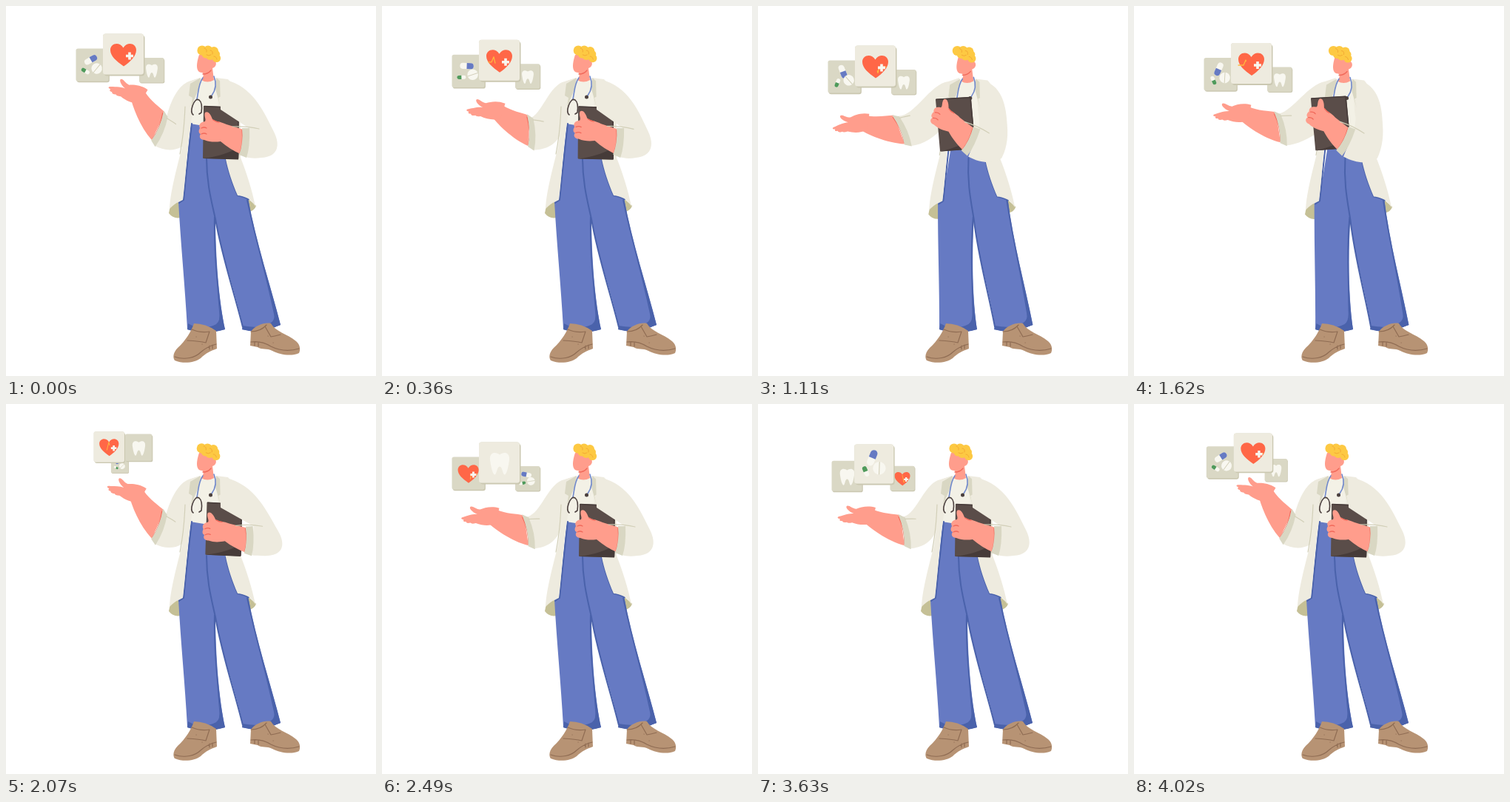
An HTML page that plays this animation: 500x500 px, repeating every 4050 ms.

```html
<!DOCTYPE html>
<html lang="en">
<head>
<meta charset="utf-8">
<title>Doctor with floating cards</title>
<style>
  html, body { margin: 0; width: 100%; height: 100%; overflow: hidden; background: #fff; }
  svg { display: block; width: 100vw; height: 100vh; }
  .line { fill: none; stroke-linecap: round; stroke-linejoin: round; }
  .coat { fill: #eeebdf; }
  .olive { fill: #d9d7c3; }
  .lining { fill: #c5c096; }
  .skin { fill: #ff9d8c; }
  .blush { stroke: #f1695a; stroke-width: 1.3; }
  .blue { fill: #667ac3; }
  .navy { fill: #4a62ab; }
  .seam { stroke: #4a62ab; stroke-width: 2; }
  .fold { stroke: #d2cfb8; stroke-width: 1.2; }
  .shoe { fill: #b79374; }
  .lace { stroke: #8f6c53; stroke-width: 1.2; }
  .white { fill: #f8f7f0; }
</style>
</head>
<body>
<svg viewBox="0 0 500 500">
  <g id="cards">
    <g class="card">
      <path fill="#ff6747" d="M0,16C-10,9 -18,2 -18,-6C-18,-15 -6,-18 -.5,-9C5,-18 17,-15 17,-6C17,2 9,10 0,16Z"/>
      <path id="pulse" class="line" stroke="#ffb83f" stroke-width="1.3" pathLength="100" stroke-dasharray="25 300"
        d="M-18,2H-11L-8,-5L-5,8L-1,-9L3,9L5,1H14"/>
      <path class="white" d="M6.2,-3h3.6v3.2h3.2v3.6h-3.2v3.2h-3.6v-3.2h-3.2v-3.6h3.2z"/>
    </g>
    <g class="card">
      <path class="white" d="M0,-11C-5,-15 -14,-15 -13,-4C-12,4 -10,14 -7,16C-4,17 -4,5 0,5C4,5 4,17 7,16C10,14 12,4 13,-4C14,-15 5,-15 0,-11Z"/>
    </g>
    <g class="card">
      <g id="capsule">
        <rect class="white" x="-11.5" y="-5" width="23" height="10" rx="5"/>
        <path class="blue" d="M0,-5H6.5a5,5 0 0 1 0,10H0Z"/>
      </g>
      <g id="smallPill">
        <rect class="white" x="-7.5" y="-3.2" width="15" height="6.4" rx="3.2"/>
        <path fill="#4f9a5b" d="M0,-3.2H4.3a3.2,3.2 0 0 1 0,6.4H0Z"/>
      </g>
      <g id="tablet">
        <circle class="white" r="9"/>
        <path class="line fold" d="M-8,3L8,-3"/>
      </g>
    </g>
  </g>

  <g class="skin">
    <path d="M266,426h14v14h-14zM336,428h14v14h-14z"/>
  </g>
  <g id="lining" class="lining">
    <path d="M220,280L222,270L240,260L236,286Q226,288 220,280Z"/>
    <path d="M322,256L338,270Q336,276 329,278Z"/>
  </g>

  <g id="legs">
    <path class="navy" d="M245,434Q270,424 296,436Q270,446 245,437ZM319,436Q345,424 371,430Q346,445 319,437Z"/>
    <path class="blue" d="M262,158L300,200L312,255L327,260C338,320 358,380 371,431Q346,441 321,437C310,385 292,340 282,285L270,205Z"/>
    <path class="navy" d="M327,260C338,320 358,380 371,431Q346,442 319,437L320,432Q345,437 358,428Q364,424 362,416C350,360 335,310 325,262Z"/>
    <path class="blue" d="M250,158L272,160L271,205L283,285C283,340 288,400 296,437Q270,444 245,436C242,380 236,320 233,264L239,261C243,230 246,190 250,158Z"/>
    <path class="navy" d="M283,285C282,340 288,400 296,437Q270,445 245,437L246,429Q265,440 284,430Q290,426 288,412C284,360 280,330 281,285Z"/>
    <path class="line seam" d="M271,205C271,240 278,265 283,288C292,340 308,385 320,434"/>
  </g>

  <g class="shoe">
    <path d="M254,429C250,440 243,452 232,462C226,468 225,475 228,479C240,484 255,482 263,476C270,469 277,466 285,463L284,439Q270,429 254,429Z"/>
    <path d="M331,440C336,432 350,427 358,429C364,440 380,443 392,453C398,458 398,465 396,469C385,474 370,471 360,466C352,462 346,465 340,461L330,459Z"/>
    <g class="line lace">
      <path d="M228,474C242,479 256,475 263,468Q272,460 284,457M251,437Q262,442 275,440L270,455Q262,453 245,452M257,447h.2M265,457h.2M275,459v5M279,458v5"/>
      <path d="M331,454Q345,452 358,460Q376,469 396,463M352,431Q344,440 331,440M350,433L358,447Q364,446 371,444M354,446h.2M361,455h.2M336,454v5M341,455v5"/>
    </g>
  </g>

  <path id="leftSleeve" class="coat"/>
  <g id="leftArm">
    <path class="skin" d="M-10,-18C-20,-16 -32,-10 -48,-10L-56,9C-40,15 -12,21 12,17Z"/>
    <path id="leftHand" class="skin" d="M12,-9C2,-13 -8,-11 -14,-9C-20,-10 -22,-14 -26,-14C-30,-13 -25,-6 -18,-3C-25,-4 -34,-1 -39,0q-3,2 2,3q-2,3 3,3q0,3 6,2q1,2 7,1C-12,13 -4,14 6,12Z"/>
    <path class="line blush" stroke-width="2" d="M-11,-15Q4,-2 11,15"/>
    <path class="olive" d="M-13,-18L-3,-18Q14,-2 22,18L12,18Q4,-2 -13,-18Z"/>
    <path class="line fold" d="M-2,-16Q6,-20 11,-22"/>
  </g>

  <g id="upper">
    <path fill="#f3f1e6" d="M260,98L287,98L292,166L249,159Z"/>
    <path class="line seam" stroke-width="3" d="M251,159C247,195 243,230 240,262L234,266M297,207C300,222 306,240 313,256Q320,257 328,261"/>
    <path class="coat" d="M263,97L247,102C243,140 242,165 238,190C232,215 222,250 221,274Q228,267 233,265L239,262C243,230 245,190 250,158L254,128Z"/>
    <path class="coat" d="M284,97L300,99C312,110 320,150 317,205C325,225 333,250 337,271Q333,264 327,260Q318,256 313,256C306,240 300,222 297,207L287,140Z"/>
    <path class="olive" d="M263,97L249,105L247,121L252,124L250,137L261,110ZM284,97L296,107L293,121L287,124L290,137L283,112Z"/>
    <path class="line fold" d="M242,136C241,156 241,170 235,200"/>
    <path class="skin" d="M261,66C257,78 256,90 265,90Q268,91 266,96L264,100Q272,105 281,100L279,84C284,83 286,76 281,73L278,64Z"/>
    <path class="line blush" d="M266,92Q273,92 277,87"/>
    <g class="line">
      <path stroke="#7088cb" stroke-width="1.6" d="M266,97C260,105 260,117 258,126M281,95C285,105 283,114 278,121"/>
      <path stroke="#4b403e" stroke-width="1.6" d="M253,147Q249,144 252,135Q256,124 261,127Q266,131 264,144L261,146"/>
    </g>
    <circle cx="276.5" cy="123" r="2.5" fill="#4b403e"/>
  </g>

  <g id="hair" fill="#fdc943">
    <circle cx="265" cy="60" r="6.6"/><circle cx="273" cy="60" r="6.5"/><circle cx="281" cy="61" r="6"/>
    <circle cx="284.5" cy="70.5" r="5.6"/><circle cx="276" cy="67" r="6"/><circle cx="270" cy="65" r="5.5"/><circle cx="284" cy="65" r="5"/>
    <path class="line" stroke="#f4a935" d="M268,57q4,1 3,5M276,60q4,0 3,5M271,66q3,2 6,0M281,68q3,0 4,4"/>
  </g>

  <g id="book">
    <path fill="#5a4d49" stroke="#5a4d49" stroke-width="2" stroke-linejoin="round" d="M268,136L314,138L313,206L267,205Z"/>
    <path fill="#463b39" d="M266,206Q298,202 315,190L314,207.5L267,206Z"/>
    <path class="line" stroke="#463b39" stroke-width="1.5" d="M268,135.5L314,137.5L313.5,206"/>
  </g>
  <path id="rightSleeve" class="coat"/>
  <g id="rightArm">
    <path class="skin" d="M321,167L298,160C290,156 282,156 279,153C277,147 273,141 269,144C267,149 271,153 269,156C262,157 260,161 262,165C260,168 260,172 263,173C260,177 263,181 268,181C275,184 283,184 290,183C298,190 308,196 317,200Z"/>
    <path class="line blush" d="M264,165Q268,163 271,165M264,173Q268,171 271,173M280,154Q284,157 288,157M319,168Q321,185 316,199"/>
    <path class="olive" d="M319,165L329,165Q330,190 325,205L315,201Q321,185 319,165Z"/>
    <path class="line fold" d="M306,163Q325,162 342,166"/>
  </g>
</svg>
<script>
const LOOP = 4050;
const $ = id => document.getElementById(id);
const set = (id, transform) => $(id).setAttribute('transform', transform);
const clamp = v => Math.min(1, Math.max(0, v));
const smooth = v => (v = clamp(v)) * v * (3 - 2 * v);
const mix = (a, b, k) => a + (b - a) * k;

// Eased value at time t from [time, value] keys
function at(keys, t) {
  const i = Math.max(1, keys.findIndex(k => k[0] >= t));
  const [t0, a] = keys[i - 1], [t1, b] = keys[i];
  return mix(a, b, smooth((t - t0) / (t1 - t0)));
}

// Blend two paths that share the same commands
function morph(a, b, k) {
  const nums = b.match(/-?[\d.]+/g);
  let i = 0;
  return a.replace(/-?[\d.]+/g, n => mix(+n, +nums[i++], k).toFixed(2));
}

const ARM = [[0, 57.6], [690, 12], [1250, 12], [1620, 23.5], [1870, 26], [2070, 56], [2290, 57.6], [2520, 22],
  [2750, 24], [2990, 56], [3170, 57.6], [3400, 22], [3620, 24], [3840, 56], [LOOP, 57.6]];
const LIFT = [[0, 0], [690, 15.5], [1300, 16], [1620, 12.5], [1850, 14], [2090, -14.5], [2250, 0], [2550, 15.5],
  [2750, 15.5], [3010, -15], [3150, 0], [3430, 15.5], [3620, 15.5], [3850, -13], [4010, 0], [LOOP, 0]];
const LEAN = [[0, 0], [450, 0], [1230, 1], [1640, 1], [2040, 0], [LOOP, 0]];
const TUCK = [[0, 0], [200, 0], [1230, 1], [1640, 1], [2060, -.16], [2500, 0], [LOOP, 0]];
const TURNS = [1870, 2750, 3612], TURN_TIME = 436;

const SLEEVE_R = [
  'M289,98C330,105 345,135 362,170C372,190 366,204 345,205C338,206 330,206 324,204L328,165L290,140Z',
  'M289,98C314,103 324,123 325,158C327,180 322,195 318,204C308,212 290,212 272,202L287,165L290,140Z'];

// Slots: x, y, size. Moves: from, to, middle size, vertical bulge.
const FRONT = [159, 65.5, 56], RIGHT = [197, 87, 34], LEFT = [117, 80, 45];
const MOVES = [[FRONT, LEFT, 32.5, 0], [RIGHT, FRONT, 30.7, -8], [LEFT, RIGHT, 7.4, 25]];

const cards = [...document.querySelectorAll('.card')];
for (const card of cards) card.insertAdjacentHTML('afterbegin',
  `<rect x="-26.5" y="-26" width="55" height="55" rx="4" fill="#cbc8b1"/>
   <rect x="-28" y="-28" width="55" height="55" rx="3.5" fill="#dad8c5"/>
   <rect x="-28" y="-28" width="55" height="55" rx="3.5" fill="#eeebdf" class="face"/>`);

function drawCards(t) {
  const lift = at(LIFT, t);
  const turned = TURNS.reduce((sum, s) => sum + clamp((t - s) / TURN_TIME), 0);
  const n = Math.floor(turned), p = turned - n;
  const placed = cards.map((card, i) => {
    const role = (i - n + 3) % 3;
    const [a, b, mid, bulge] = MOVES[role];
    const x = mix(a[0], b[0], p);
    const y = mix(a[1], b[1], p) + 2 * p * (1 - p) * bulge + lift;
    const size = a[2] * (1 - p) ** 2 + 2 * mid * p * (1 - p) + b[2] * p * p;
    const light = smooth((p - .5) / .4);
    card.setAttribute('transform', `translate(${x} ${y}) scale(${size / 56})`);
    card.querySelector('.face').setAttribute('opacity', [1 - light, light, 0][role]);
    return { card, size };
  });
  placed.sort((a, b) => a.size - b.size).forEach(c => $('cards').append(c.card));

  const spin = 360 * t / LOOP;
  set('capsule', `translate(-3 -9) rotate(${spin - 30})`);
  set('smallPill', `translate(-12 10) rotate(${-150 - spin})`);
  set('tablet', `translate(7 5.5) rotate(${spin - 30})`);
  $('pulse').setAttribute('stroke-dashoffset', 31 - 129 * (t % (LOOP / 3)) / (LOOP / 3));
}

function drawLeftArm(angle, lean) {
  const k = (57.6 - angle) / 45.6, r = angle * Math.PI / 180;
  const x = mix(205, 190, k), y = mix(162, 174, k) - 7 * lean;
  const spot = (px, py) =>
    `${x + px * Math.cos(r) - py * Math.sin(r)},${y + px * Math.sin(r) + py * Math.cos(r)}`;
  const s = 11 * lean, up = 7 * lean;
  set('leftArm', `translate(${x} ${y}) rotate(${angle})`);
  set('leftHand', `translate(-51 0) rotate(${.55 * angle - 17 - angle})`);
  $('leftSleeve').setAttribute('d',
    `M${262 + s},97L${247 + s},102C${mix(234, 222, k) + s},${mix(107, 105, k)} ` +
    `${mix(224, 212, k)},${mix(124, 156, k) - up} ${spot(-5, -18)}L${spot(20, 18)}` +
    `C${mix(212, 225, k)},${mix(195, 194, k) - up} ${mix(226, 239, k)},${mix(197, 183, k) - up} ` +
    `${mix(238, 243, k) + s},${mix(190, 161, k)}L${252 + s},130Z`);
}

function draw() {
  const t = performance.now() % LOOP;
  const lean = at(LEAN, t), tuck = at(TUCK, t);
  const shift = `translate(${11 * lean} ${1.5 * lean})`;
  const skew = 11 * lean / 177;

  drawCards(t);
  drawLeftArm(at(ARM, t), lean);
  set('upper', shift);
  set('lining', shift);
  set('rightSleeve', shift);
  set('legs', `matrix(1 0 ${-skew} 1 ${437 * skew} 0)`);
  set('hair', `translate(${4.5 * tuck} ${.5 * tuck})`);
  set('book', `translate(${-24.5 * tuck} ${8 * tuck - 21 * tuck * tuck}) rotate(${-6 * tuck} 291 171)`);
  set('rightArm', `translate(${-36 * tuck} ${-3 * tuck}) rotate(${21 * tuck} 320 184)`);
  $('rightSleeve').setAttribute('d', morph(...SLEEVE_R, tuck));
  requestAnimationFrame(draw);
}
draw();
</script>
</body>
</html>
```
